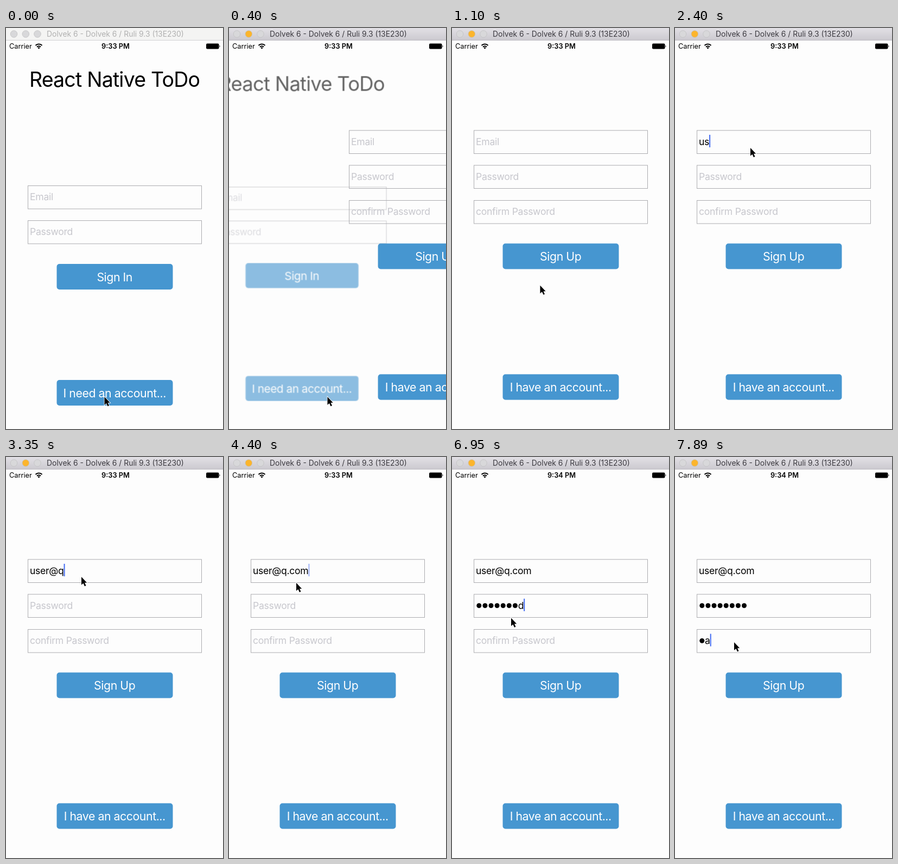
Animation, 400 px wide and 736 px high, one loop 7.99 s. Source, as an HTML page:

```html
<!DOCTYPE html>
<html lang="en">
<head>
<meta charset="utf-8">
<title>ToDo sign up</title>
<style>
  html, body { margin: 0; width: 100%; height: 100%; overflow: hidden; background: #fdfdfd; }
  svg { display: block; width: 400px; height: 736px; font-family: Inter, Roboto, sans-serif; }
  text { white-space: pre; }
  .bar { font-size: 13.9px; }
  .status { font-size: 12.8px; }
  .heading { font-size: 37.5px; letter-spacing: -.8px; }
  .field { font-size: 17.6px; letter-spacing: -.3px; }
  .hint { fill: #c7c7cd; }
  .box { fill: none; stroke: #acacb0; }
  .label { font-size: 21.3px; letter-spacing: -.45px; fill: #fff; }
  .button { fill: #4696d0; }
  .mid { text-anchor: middle; }
</style>
</head>
<body>
<svg id="stage" viewBox="0 0 400 736">
  <defs>
    <linearGradient id="active" x2="0" y2="1">
      <stop stop-color="#e2e0e5"/>
      <stop offset="1" stop-color="#cbc9cf"/>
    </linearGradient>
  </defs>
  <rect width="400" height="736" fill="#fdfdfd"/>
  <g id="signIn"></g>
  <g id="signUp"></g>
  <g id="chrome">
    <rect id="bar" width="400" height="23"/>
    <path d="M0 22.5H400" stroke="#b0aeb4" stroke-opacity=".5"/>
    <g stroke="#c0c0c2" stroke-width=".8" fill="#d8d8da">
      <circle cx="14.5" cy="11" r="6.3"/>
      <circle id="amber" cx="36.3" cy="11" r="6.3"/>
      <circle cx="58" cy="11" r="6.3"/>
    </g>
    <text id="caption" class="bar mid" x="201.5" y="16">Dolvek 6 - Dolvek 6 / Ruli 9.3 (13E230)</text>
    <text class="status" x="6" y="38">Carrier</text>
    <g fill="none" stroke="#000" stroke-width="2">
      <path d="M54.5 32A8.3 8.3 0 0 1 66.5 32"/>
      <path d="M57 34.8A5 5 0 0 1 64 34.8"/>
    </g>
    <path d="M60.5 38.6L58.4 36.4A3 3 0 0 1 62.6 36.4Z"/>
    <text id="clock" class="status mid" x="202" y="38" font-weight="600"></text>
    <rect x="369" y="28.5" width="23.5" height="10" rx="2"/>
    <path d="M393.5 31.5q2 2 0 4z"/>
  </g>
  <path id="cursor" d="M0 0V14.8L3.4 11.7L6 17.2L8.5 16.1L6 10.8H10.2Z"
        fill="#000" stroke="#fff" stroke-width="1.6" paint-order="stroke"/>
</svg>
<script>
const LOOP = 7990;
const EMAIL = "user@q.com", PASS = "password";
const EMAIL_KEYS = [2200, 2390, 2620, 2800, 3050, 3250, 3450, 3600, 3750, 3900];
const PASS_KEYS = [5350, 5500, 5650, 5840, 6050, 6250, 6450, 6650];
const CONFIRM_KEYS = [7680, 7880];
const FOCUS = [1600, 5150, 7350, LOOP];
const DOT = 11.1;
// time, x, y
const CURSOR_PATH = [
  [0, 181.5, 677], [750, 181.5, 677], [1500, 139, 220], [3400, 139, 220], [4100, 124, 231],
  [4500, 124, 231], [5050, 109, 272], [6750, 109, 272], [7250, 109, 340], [LOOP, 109, 340]
];

const $ = id => document.getElementById(id);
const clamp = v => Math.max(0, Math.min(1, v));
const ease = u => (1 - Math.cos(Math.PI * clamp(u))) / 2;

function add(parent, tag, attrs, text) {
  const el = document.createElementNS("http://www.w3.org/2000/svg", tag);
  for (const k in attrs) el.setAttribute(k, attrs[k]);
  if (text) el.textContent = text;
  parent.appendChild(el);
  return el;
}

function addButton(page, y, label) {
  add(page, "rect", { class: "button", x: 93.5, y, width: 214, height: 47, rx: 5 });
  add(page, "text", { class: "label mid", x: 200.2, y: y + 31.5 }, label);
}

function addField(page, y, hint) {
  add(page, "rect", { class: "box", x: 40.5, y: y + .5, width: 320, height: 42.5 });
  const base = y + 27;
  const dots = [...PASS].map((_, i) =>
    add(page, "circle", { cx: 49.8 + i * DOT, cy: base - 5.8, r: 4.5, visibility: "hidden" }));
  return {
    dots,
    hint: add(page, "text", { class: "field hint", x: 44, y: base }, hint),
    value: add(page, "text", { class: "field", x: 44, y: base }),
    caret: add(page, "rect", { y: y + 8.5, width: 2, height: 23, fill: "#426bf2", opacity: 0 })
  };
}

const signIn = $("signIn"), signUp = $("signUp");
add(signIn, "text", { class: "heading mid", x: 200, y: 108 }, "React Native ToDo");
addField(signIn, 289, "Email");
addField(signIn, 353, "Password");
addButton(signIn, 433, "Sign In");
addButton(signIn, 646, "I need an account...");

const fields = [
  addField(signUp, 187.5, "Email"),
  addField(signUp, 251.5, "Password"),
  addField(signUp, 316, "confirm Password")
];
addButton(signUp, 395.5, "Sign Up");
addButton(signUp, 635.5, "I have an account...");

function blink(age) {
  const u = age % 1000;
  return u < 850 ? clamp((600 - u) / 200) : (u - 850) / 150;
}

function drawField(i, t, word, keys, secret) {
  const f = fields[i];
  const focused = t >= FOCUS[i] && t < FOCUS[i + 1];
  const n = keys.filter(k => k <= t).length;
  const hidden = secret ? (focused ? Math.max(0, n - 1) : n) : 0;
  f.hint.setAttribute("visibility", n ? "hidden" : "visible");
  f.dots.forEach((d, j) => d.setAttribute("visibility", j < hidden ? "visible" : "hidden"));
  f.value.textContent = word.slice(hidden, n);
  const x = 44 + hidden * DOT;
  f.value.setAttribute("x", x);
  const last = n ? keys[n - 1] : FOCUS[i];
  f.caret.setAttribute("opacity", focused ? blink(t - last) : 0);
  if (focused) f.caret.setAttribute("x", x + (n > hidden ? f.value.getComputedTextLength() : 0));
}

// the slide advances in steps of 100 ms
function drawPages(t) {
  const p = ease((Math.floor(t / 100) * 100 - 110) / 547);
  const s = 1 - .05 * p;
  signIn.setAttribute("transform", `translate(${200 - 120.5 * p} 379) scale(${s}) translate(-200 -379)`);
  signIn.setAttribute("opacity", 1 - .7 * p);
  signIn.style.display = t < 800 ? "" : "none";
  signUp.setAttribute("transform", `translate(${400 * (1 - p)} 0)`);
}

function drawChrome(t) {
  const active = t >= 100;
  $("bar").setAttribute("fill", active ? "url(#active)" : "#f4f4f3");
  $("amber").setAttribute("fill", active ? "#fcb52c" : "#d8d8da");
  $("caption").setAttribute("fill", active ? "#3c3a40" : "#b0b0b0");
  $("clock").textContent = t < 5000 ? "9:33 PM" : "9:34 PM";
}

function drawCursor(t) {
  const i = CURSOR_PATH.findIndex(k => k[0] > t);
  const [t0, x0, y0] = CURSOR_PATH[i - 1], [t1, x1, y1] = CURSOR_PATH[i];
  const u = ease((t - t0) / (t1 - t0));
  $("cursor").setAttribute("transform", `translate(${x0 + (x1 - x0) * u} ${y0 + (y1 - y0) * u})`);
}

function draw(t) {
  drawChrome(t);
  drawPages(t);
  drawField(0, t, EMAIL, EMAIL_KEYS, false);
  drawField(1, t, PASS, PASS_KEYS, true);
  drawField(2, t, PASS, CONFIRM_KEYS, true);
  drawCursor(t);
}

let start;
function frame(now) {
  start ??= now;
  draw((now - start) % LOOP);
  requestAnimationFrame(frame);
}
draw(0);
requestAnimationFrame(frame);
</script>
</body>
</html>
```
